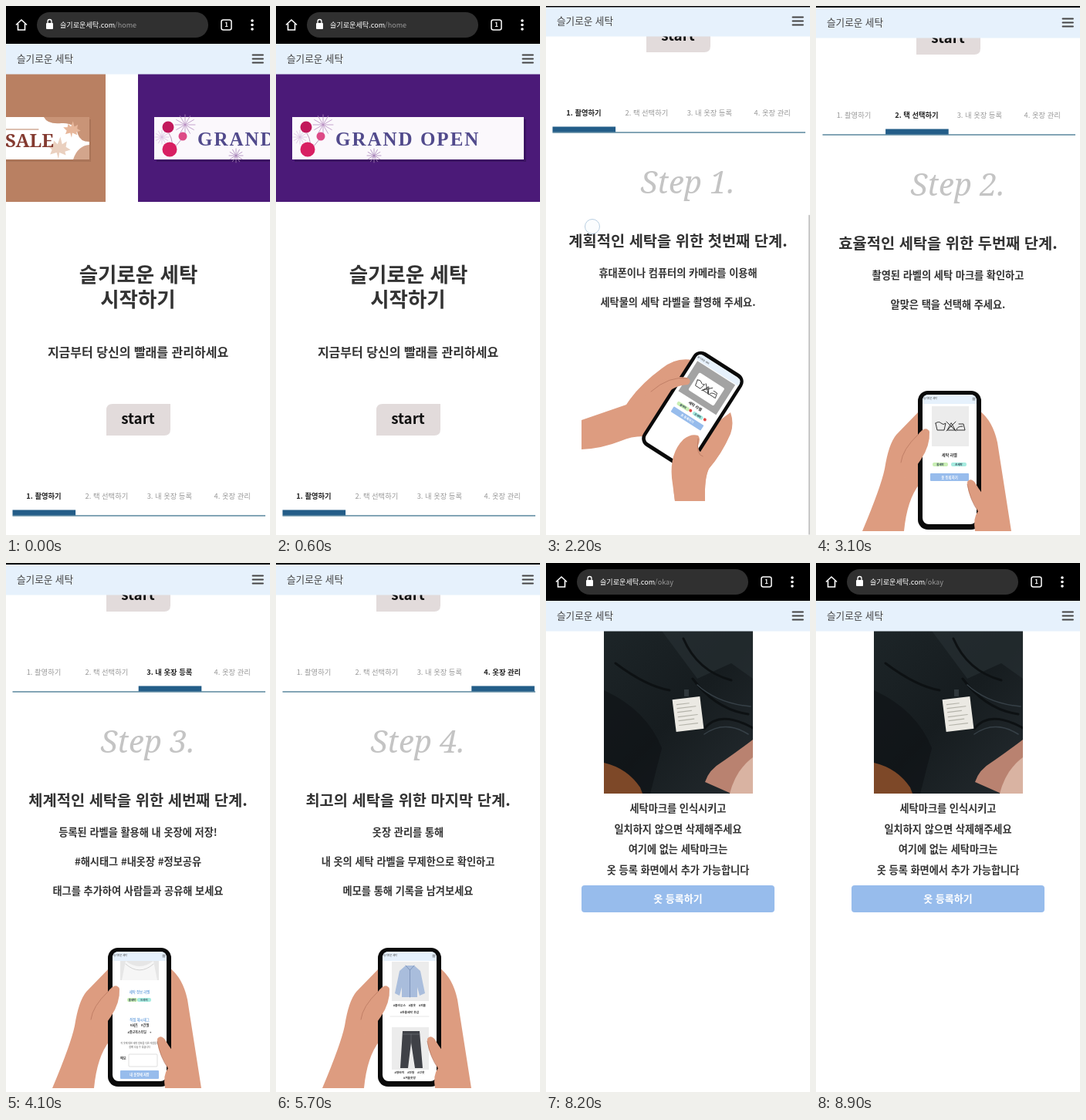
An HTML page that plays this animation: 342 px wide and 686 px high, repeating every 9 s.

```html
<!DOCTYPE html>
<html lang="ko">
<head>
<meta charset="utf-8">
<style>
html, body { margin: 0; width: 100%; height: 100%; overflow: hidden; background: #fff; }
svg { display: block; width: 100%; height: 100%; }
text { font-family: "Noto Sans CJK KR", "Noto Sans CJK", sans-serif; white-space: pre; }
.serif { font-family: "Noto Serif", serif; }
</style>
</head>
<body>
<svg id="stage" viewBox="0 0 342 686"></svg>
<script>
const LOOP = 9000, PITCH = 384, TAB_W = 81.6;
const INK = '#333', SKIN = '#dd9c80', CREASE = '#b97860', PALE = '#e6f1fc', BLUE = '#97bcec';

const rect = (x, y, w, h, fill, r = 0, more = '') =>
  `<rect x="${x}" y="${y}" width="${w}" height="${h}" rx="${r}" fill="${fill}" ${more}/>`;
const circle = (x, y, r, fill, more = '') => `<circle cx="${x}" cy="${y}" r="${r}" fill="${fill}" ${more}/>`;
const path = (d, fill, more = '') => `<path d="${d}" fill="${fill}" ${more}/>`;
const line = (d, stroke, w = 1) => path(d, 'none', `stroke="${stroke}" stroke-width="${w}" stroke-linecap="round"`);
// y is the middle of the glyphs
const label = (x, y, s, size, weight = 700, fill = INK, more = 'text-anchor="middle"') =>
  `<text x="${x}" y="${y + size * 0.36}" font-size="${size}" font-weight="${weight}" fill="${fill}" ${more}>${s}</text>`;
const group = (body, more = '') => `<g ${more}>${body}</g>`;
const hidden = (id, body) => group(body, `id="${id}" visibility="hidden"`);

function burst(x, y, r, color) {
  let d = '';
  for (let i = 0; i < 12; i++) {
    const a = i * Math.PI / 6;
    d += `M${x} ${y}l${(r * Math.cos(a)).toFixed(1)} ${(r * Math.sin(a)).toFixed(1)}`;
  }
  return line(d, color, 0.8);
}

const leaf = (x, y, k, color) =>
  path('M0 12L-2 5L-9 7L-7 2L-12-3L-6-3L-5-8L-1-4L2-12L4-4L9-7L8-1L13 2L7 4L8 8L1 5Z', color,
    `transform="translate(${x} ${y}) scale(${k})"`);

const orangeSlide = rect(0, 88, 342, 166, '#b98062') +
  rect(23, 147, 300, 55, '#8d5c45', 0, 'opacity=".35"') + rect(21, 144, 300, 55, '#fff') +
  path('M321 144H262Q267 154 285 152Q303 151 306 166Q309 176 321 176Z', '#c99477') +
  path('M321 180Q306 181 300 199H321Z', '#d3a58c') +
  leaf(298, 160, 0.9, '#e7b79b') + leaf(281, 184, 1.2, '#ead0bf') +
  line('M205 160H255', '#b98062', 1) +
  label(275, 174, 'FALL SALE', 24, 700, '#843a30', 'class="serif" text-anchor="end"');

const purpleSlide = rect(0, 88, 342, 166, '#4b1a78') +
  rect(24, 147, 300, 55, '#2c0c4c', 0, 'opacity=".5"') + rect(21, 144, 300, 55, '#fbf8fc') +
  burst(61, 154, 13, '#b78fc0') + burst(31, 170, 9, '#d9bfdf') + burst(127, 194, 9, '#a884b8') +
  line('M40 165Q48 178 41 186M57 172Q51 180 41 190', '#a06a9c', 0.7) +
  circle(39, 157, 7.5, '#c2185b') + circle(41, 186, 9.5, '#d81f62') + circle(58, 169, 5.5, '#dd4a86') +
  label(77, 172, 'GRAND OPEN', 25, 700, '#514a8c',
    'style="font-family:\'Liberation Serif\',serif;letter-spacing:2px"');

const blueSlide = rect(0, 88, 342, 166, 'url(#water)') +
  circle(310, 249, 32, '#9be9f7', 'opacity=".4" stroke="#d6f8fd"') +
  circle(262, 243, 5, '#b7f0f9', 'opacity=".5"') + circle(282, 228, 3, '#b7f0f9', 'opacity=".6"') +
  rect(14, 144, 314, 60, '#1a9cc4', 0, 'opacity=".3"') + rect(17, 142, 311, 60, '#3fc0e2') +
  [[25, 186, 4], [36, 190, 5], [292, 194, 4], [303, 189, 5], [307, 178, 4]].map(b => circle(...b, '#e9fbff')).join('') +
  rect(48, 182, 13, 11, '#2d7fb0', 2) + rect(68, 164, 25, 29, '#f3f5f6', 2) + circle(80, 181, 7, '#59616b') +
  rect(243, 164, 25, 29, '#f3f5f6', 2) + circle(255, 181, 7, '#59616b') + rect(273, 182, 12, 9, '#c9404c', 3) +
  label(167, 182, '슬기로운세탁', 21, 700, '#fff', 'text-anchor="middle" letter-spacing="2.6"');

const slides = [orangeSlide, purpleSlide, blueSlide]
  .map((s, i) => group(group(s, 'clip-path="url(#slideBox)"'), `transform="translate(${i * PITCH} 0)"`)).join('');

const intro = label(171.5, 348, '슬기로운 세탁', 26.5) + label(171, 380, '시작하기', 26.5) +
  label(171, 449, '지금부터 당신의 빨래를 관리하세요', 16) +
  path('M138 516H213V549Q213 557 205 557H130V524Q130 516 138 516Z', '#e2dbdb', 'id="start"') +
  label(171, 535.5, 'start', 18.8, 700, '#111');

const tabNames = ['1. 촬영하기', '2. 택 선택하기', '3. 내 옷장 등록', '4. 옷장 관리'];
const tabs = tabNames.map((s, i) =>
  label(49 + i * 81.4, 142, s, 9.3, 500, '#999', `id="tab${i}" text-anchor="middle"`)).join('') +
  rect(8.5, 166, 327.5, 2, '#83a5b6') + rect(8.5, 159.5, TAB_W, 7, '#235d88', 0, 'id="marker"');

const tag = (x, y, w, fill, s) => rect(x, y, w, 5, fill, 2) + label(x + w / 2, y + 2.5, s, 3.4, 700, '#345');
const shot = (y, h) => rect(150, y, 48, h, '#ececec');
const tiny = (y, s, size = 4.2, fill = INK) => label(173, y, s, size, 700, fill);

const washSigns = line('M-18-4l2 9h9l2-9q-3 3-6 0t-7 0M-4-6L8 6M8-6L-4 6M2-4L-3 5H7ZM9 5h11l-2-8h-6M9 5q0-5 8-5', '#333', 1);

const tiltedPhone = group(
  path('M46 537L104 517Q120 492 150 470Q168 455 190 459L180 520L126 558Q110 558 97 564Q72 574 46 575Z', SKIN) +
  path('M239 527Q244 541 239 555Q228 580 211 600Q205 612 206 642H167Q161 600 170 575L200 556Z', SKIN) +
  group(
    rect(-37.5, -72, 75, 144, '#0a0a0a', 12) + rect(-33, -67, 66, 134, '#fff', 7) +
    path('M-33-58V-60Q-33-67-26-67H26Q33-67 33-60V-58Z', PALE) +
    label(-23, -62, '슬기로운 세탁', 3, 400) + rect(-29, -57, 58, 46, '#a3a3a3') +
    rect(-19, -46, 39, 27, '#fff', 2) + group(washSigns, 'transform="translate(-.5 -33) scale(.85)"') +
    label(0, -6, '세탁 라벨', 5) + tag(-22, 0, 18, '#c9efb4', '물세탁') + tag(2, 0, 15, '#a6ece0', '손세탁') +
    circle(-2, 2, 2, '#dd4a44') + circle(20, 2, 2, '#dd4a44') +
    rect(-23, 9, 46, 8, BLUE, 1) + label(0, 13, '옷 등록하기', 4, 700, '#fff'),
    'transform="translate(190 524) rotate(32.5)"') +
  path('M140 489Q160 478 183 482Q190 486 184 491Q165 492 152 506L128 545L120 520Z', SKIN) +
  path('M163 612Q160 580 178 562Q188 554 197 557Q201 561 197 570Q197 585 214 577Q230 556 239 531Q243 545 237 558Q228 580 211 600Q205 612 206 642H167Z', SKIN) +
  line('M136 500Q160 479 183 483M197 561Q194 582 203 584', CREASE, 0.8),
  'transform="translate(0 3)"');

const uprightPhone = screen =>
  path('M60 681Q84 624 89 600Q94 568 104 556L134 525V620Q118 640 114 681Z', SKIN) +
  path('M212 525Q229 538 235 566L253 681H212L200 640Z', SKIN) +
  rect(132, 499, 82, 180, '#0a0a0a', 13) + rect(138, 504, 70, 168, '#fff', 8) +
  path('M138 516V512Q138 504 146 504H200Q208 504 208 512V516Z', PALE) +
  label(148, 509, '슬기로운 세탁', 3, 400) + line('M203 508h3m-3 1.5h3m-3 1.5h3', INK, 0.5) + screen +
  path('M132 556Q142 543 147 552Q148 570 136 588Q122 609 113 612L108 590Z', SKIN) +
  path('M196 617Q200 611 206 618Q214 632 226 645Q243 655 246 681H206Q203 664 210 655Q196 633 196 617Z', SKIN) +
  line('M110 592Q112 575 132 556M196 620Q200 642 210 655', CREASE, 0.8);

const pickScreen = shot(519, 52) + group(washSigns, 'transform="translate(173 545)"') +
  tiny(582, '세탁 라벨', 5) + tag(151, 592, 20, '#c9efb4', '물세탁') + tag(175, 592, 20, '#a6ece0', '손세탁') +
  rect(148, 606, 50, 10, BLUE, 1) + tiny(611, '옷 등록하기', 4.4, '#fff');

const saveScreen = rect(148, 516, 50, 25, '#e6e6e6') +
  path('M150 541L155 516Q173 530 191 516L196 541Z', '#f6f6f6') + line('M155 520Q173 536 191 520', '#d2d2d2', 1) +
  tiny(556, '세탁 정보 라벨', 4.4, '#78aae0') + tag(157, 564, 13, '#c9efb4', '물세탁') + tag(170, 564, 18, '#a6ece0', '드라이') +
  tiny(592, '직접 해시태그', 4.4, '#78aae0') + tiny(599, '#셔츠　#간절') + tiny(609, '#출근복스타일　+', 4) +
  tiny(623, '이 옷에 대한 세탁 정보를 다른 사람들과', 3, '#888') + tiny(628, '함께 나눌 수 있습니다', 3, '#888') +
  label(152, 643, '메모', 4) + rect(159, 637, 37, 16, '#fff', 1, 'stroke="#ccc" stroke-width=".6"') +
  rect(148, 658, 50, 11, BLUE, 1) + tiny(663.5, '내 옷장에 저장', 4.2, '#fff');

const closetScreen = shot(517, 51) +
  path('M168 522H179L187 529L193 558L186 561L183 550V563H163V550L160 561L154 558L160 529Z', '#a9bddc') +
  line('M168 522L173.500 528L179 522M173.500 528V563', '#6c84ad', 0.7) +
  tiny(574, '#블라우스　#봄옷　#외출', 3.8) + tiny(583, '#찬물세탁 옷감', 3.8) + line('M148 588H198', '#ccc', 0.5) +
  shot(602, 55) + path('M164 607H186L190 655H180L175 622L171 655H161Z', '#3f4147') +
  line('M164 611H186M175 611V623', '#74767c', 0.6) + tiny(661, '#청바지　#진청　#긴옷', 3.8) + tiny(668, '#겨울옷장', 3.8);

const steps = [
  ['계획적인 세탁을 위한 첫번째 단계.', ['휴대폰이나 컴퓨터의 카메라를 이용해', '세탁물의 세탁 라벨을 촬영해 주세요.'], tiltedPhone],
  ['효율적인 세탁을 위한 두번째 단계.', ['촬영된 라벨의 세탁 마크를 확인하고', '알맞은 택을 선택해 주세요.'], uprightPhone(pickScreen)],
  ['체계적인 세탁을 위한 세번째 단계.', ['등록된 라벨을 활용해 내 옷장에 저장!', '#해시태그 #내옷장 #정보공유', '태그를 추가하여 사람들과 공유해 보세요'], uprightPhone(saveScreen)],
  ['최고의 세탁을 위한 마지막 단계.', ['옷장 관리를 통해', '내 옷의 세탁 라벨을 무제한으로 확인하고', '메모를 통해 기록을 남겨보세요'], uprightPhone(closetScreen)]
].map(([title, lines, art], i) => hidden('step' + i,
  `<text class="serif" x="183.5" y="246" font-size="40" font-style="italic" fill="#c4c4c4" text-anchor="middle">Step ${i + 1}.</text>` +
  label(171, 307.5, title, 19.8) + lines.map((s, n) => label(171, 349 + n * 38, s, 13.2)).join('') + art)).join('');

const home = group(
  group(slides, 'id="slides"') + intro + group(tabs + steps, 'transform="translate(0 494)"'), 'id="home"');

const photo = group(
  rect(75, 88, 193, 211, 'url(#cloth)') +
  path('M75 165Q130 190 150 240L135 299H75Z', '#0e1214', 'opacity=".6"') +
  path('M150 88L196 150L240 130L268 150V88Z', '#2b3337', 'opacity=".55"') +
  line('M190 150Q220 190 262 196M178 98Q196 140 240 152M90 130Q130 160 160 165M205 215Q225 190 268 214', '#0d1113', 3) +
  line('M196 158Q222 182 265 186M205 222Q232 203 262 222', '#364047', 1.5) +
  path('M75 259Q105 266 122 291L125 299H75Z', '#7d4828') +
  path('M268 229Q246 246 228 258Q211 268 206 284L240 299H268Z', '#b98270') +
  path('M268 252Q246 268 238 299H268Z', '#d9b3a2') +
  rect(179, 164, 6, 9, '#30383c') +
  group(rect(-18, -21, 36, 42, '#ebe9e3') + line('M-13-14h16M-13-9h24M-13-4h18M-13 2h25M-13 7h20M-13 13h24', '#b4b3aa', 1.2),
    'transform="translate(184 196) rotate(-7)"'), 'clip-path="url(#photoBox)"');

const okay = hidden('okay', rect(0, 88, 342, 598, '#fff') + photo +
  ['세탁마크를 인식시키고', '일치하지 않으면 삭제해주세요', '여기에 없는 세탁마크는', '옷 등록 화면에서 추가 가능합니다']
    .map((s, i) => label(171, 318.5 + i * 26.5, s, 13.2)).join('') +
  rect(46, 418, 250, 35, BLUE, 4) + label(171, 435.5, '옷 등록하기', 13, 700, '#fff'));

const browser = group(
  rect(0, 0, 342, 49, '#000') + rect(40, 8, 222, 33, '#303030', 16.5) +
  path('M13 24.500L20 18L27 24.500M15.500 23V31H24.500V23', 'none', 'stroke="#fff" stroke-width="1.6"') +
  rect(52, 22, 9, 8, '#fff', 1) + path('M54 22V20a2.500 2.500 0 0 1 5 0V22', 'none', 'stroke="#fff" stroke-width="1.3"') +
  `<text x="70" y="28" font-size="9.1" fill="#fff">슬기로운세탁.com<tspan id="route" fill="#9a9a9a"></tspan></text>` +
  rect(279, 18, 13, 13, 'none', 2.5, 'stroke="#fff" stroke-width="1.5"') + label(285.5, 24.5, '1', 8, 700, '#fff') +
  [19, 24.5, 30].map(y => circle(319, y, 1.8, '#fff')).join('') +
  rect(0, 49, 342, 39.5, PALE) + label(14, 68.5, '슬기로운 세탁', 12.6, 500, '#444', '') +
  line('M319.500 63.500H333M319.500 68.500H333M319.500 73.500H333', '#444', 1.8), 'id="browser"');

document.getElementById('stage').innerHTML =
  `<defs>
    <linearGradient id="water" x2=".4" y2="1"><stop stop-color="#1badde"/><stop offset=".6" stop-color="#30bce0"/><stop offset="1" stop-color="#74d8ed"/></linearGradient>
    <linearGradient id="cloth" x2="1" y2="1"><stop stop-color="#1d2528"/><stop offset=".5" stop-color="#161c1f"/><stop offset="1" stop-color="#242b2f"/></linearGradient>
    <clipPath id="slideBox">${rect(0, 88, 342, 166, '#000')}</clipPath>
    <clipPath id="photoBox">${rect(75, 88, 193, 211, '#000')}</clipPath>
  </defs>` + rect(0, 0, 342, 686, '#fff') + home + okay +
  rect(340, 0, 2, 415, '#c9c9c9', 1, 'id="scrollbar"') + browser + rect(0, 0, 342, 1.5, '#000') +
  circle(0, 0, 9.5, '#eaf4fc', 'id="touch" stroke="#b9cfe2"');

const $ = id => document.getElementById(id);
const show = (id, on) => $(id).setAttribute('visibility', on ? 'visible' : 'hidden');
const move = (id, x, y) => $(id).setAttribute('transform', `translate(${x.toFixed(2)} ${y.toFixed(2)})`);
const smooth = u => u * u * (3 - 2 * u);

// keys: [time, value] pairs, eased between neighbours
function tween(t, keys) {
  const next = keys.findIndex(k => k[0] > t);
  if (next < 0) return keys[keys.length - 1][1];
  if (next === 0) return keys[0][1];
  const [t0, a] = keys[next - 1], [t1, b] = keys[next];
  return a + (b - a) * smooth((t - t0) / (t1 - t0));
}

const SCROLL = [[950, 0], [1200, 142], [1400, 190], [2050, 497], [2200, 497], [2350, 494], [6000, 494], [6900, 170]];
const BAR = [[950, 0], [1150, -47], [1400, -47], [2050, -49], [2200, -49], [2350, -47], [6050, -47], [6350, 0]];
const SLIDE = [[0, 213], [250, 384], [850, 384], [1100, 768]];
const MARKER = [[2800, 0], [2900, 1], [4000, 1], [4100, 2], [5000, 2], [5100, 3]];
const TOUCHES = [
  { from: 980, to: 1400, x: 87, y: [[980, 655], [1200, 517], [1400, 440]] },
  { from: 1800, to: 2300, x: 60, y: [[1800, 430], [2200, 286]] },
  { from: 2750, to: 2900, x: 131, y: [[0, 142]] },
  { from: 7600, to: 7850, x: 171, y: [[0, 366]] }
];

function draw(t) {
  const scroll = tween(t, SCROLL), bar = tween(t, BAR), done = t >= 8000;
  const active = t < 2800 ? 0 : t < 4000 ? 1 : t < 5000 ? 2 : 3;
  move('home', 0, -scroll);
  move('browser', 0, bar);
  move('slides', -tween(t, SLIDE), 0);
  $('marker').setAttribute('x', 8.5 + tween(t, MARKER) * TAB_W);
  tabNames.forEach((_, i) => {
    $('tab' + i).setAttribute('fill', i === active ? '#222' : '#999');
    $('tab' + i).setAttribute('font-weight', i === active ? 700 : 400);
    show('step' + i, i === active && !done);
  });
  show('home', !done);
  show('okay', done);
  $('route').textContent = done ? '/okay' : '/home';
  $('start').setAttribute('fill', t >= 7600 && t < 7900 ? '#d2caca' : '#e2dbdb');

  show('scrollbar', (t > 950 && t < 2500) || (t > 6000 && t < 7100));
  move('scrollbar', 0, 57 + (scroll - 142) * 0.602);

  const touch = TOUCHES.find(p => t >= p.from && t < p.to);
  show('touch', touch);
  if (touch) {
    move('touch', touch.x, tween(t, touch.y));
    $('touch').setAttribute('fill-opacity', 0.9 * (touch.to - t) / (touch.to - touch.from));
  }
}

function frame(now) {
  draw(now % LOOP);
  requestAnimationFrame(frame);
}
draw(0);
requestAnimationFrame(frame);
</script>
</body>
</html>
```
